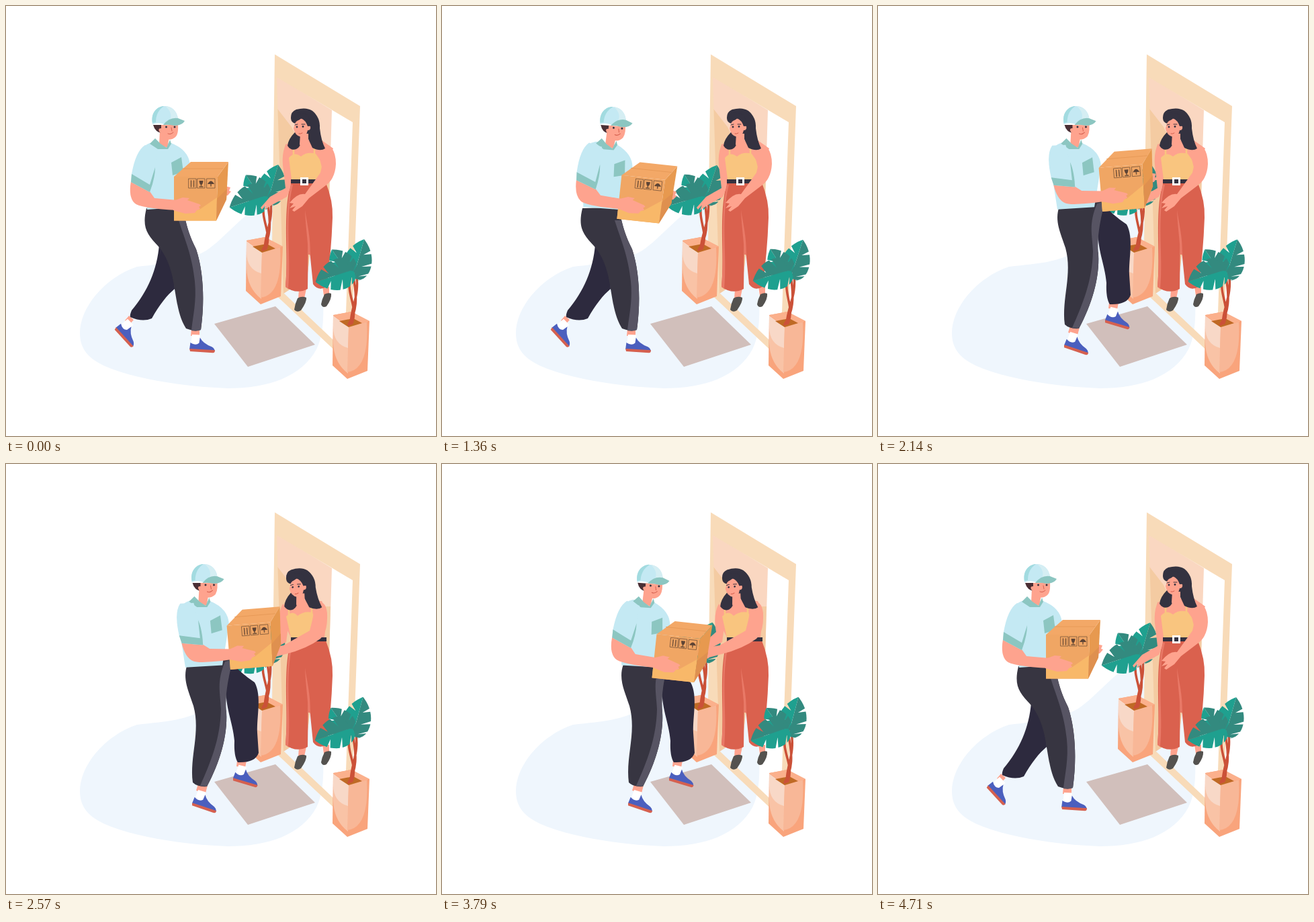
Recreate the animation shown at these times as an HTML page. Size 640 by 640 pixels, loop 4.78 s.

```html
<!DOCTYPE html>
<html lang="en">
<head>
<meta charset="utf-8">
<title>Parcel delivery</title>
<style>
html, body { margin: 0; width: 100%; height: 100%; overflow: hidden; background: #fff; }
svg { display: block; width: 100%; height: 100%; }
.skin { fill: #fea38e; }
.dark { fill: #343240; }
.near { fill: #373541; }
.far { fill: #2d2a3e; }
.stripe { fill: #575463; }
.cloth { fill: #c4e9f3; }
.teal { fill: #8cc6c1; }
.white { fill: #fff; }
.line { fill: none; stroke-linecap: round; stroke-linejoin: round; }
</style>
</head>
<body>
<svg viewBox="0 0 640 640">
<defs>
  <g id="shoe">
    <path class="white" d="M2,-9 3,-25H15L16,-10Z"/>
    <path fill="#4b5fbe" d="M0,-3 1,-13Q9,-8 14,-13L15,-21Q20,-12 33,-8 37,-6 38,-2Z"/>
    <path fill="#d5604f" d="M0,-4 38,-3Q38,1 35,1L1,0Z"/>
  </g>
  <g id="pot">
    <path fill="#f9a47c" d="M358,349 385,344 412,358 409,432 379,444 357,424Z"/>
    <path fill="#f9c3a6" d="M358,350 381,367 380,436Q359,420 358,390Z"/>
    <path fill="#f8d8c7" d="M358,350 381,367 380,398Q358,392 358,366Z"/>
    <path fill="#f8b797" d="M381,367 408,359Q412,430 379,434Z"/>
    <path fill="#fbb08c" d="M358,349 385,344 412,358 381,367Z"/>
    <path fill="#bf6a25" d="M367,358 388,354 401,361 381,367Z"/>
  </g>
  <g id="plant"></g>
</defs>

<path fill="#eff6fd" d="M110,487C110,450 145,405 195,388C235,383 265,383 298,364C325,346 350,312 385,292C430,290 460,365 472,428C473,460 473,490 462,511C440,552 390,569 330,569C260,566 190,555 145,535C120,523 110,508 110,487Z"/>
<path fill="#d1bfbb" d="M310,473 401,447 460,504 360,537Z"/>

<path fill="#fad7c1" d="M402,104 485,155 480,320 452,372 448,405 413,428 398,425Z"/>
<path fill="#f4cba2" d="M404,153 425,180 440,212H483L480,320 452,372 448,405 413,428 398,425Z"/>
<path fill="#f8dbb9" fill-rule="evenodd" d="M400,72 527,149 513,535 395,424ZM403,106 516,173 504,513 413,427Z"/>

<use href="#pot"/>
<use href="#plant" class="sway"/>

<g id="woman">
  <path class="skin" d="M436,421H447L444,435 435,436ZM471,418H481L481,430 473,431Z"/>
  <path fill="#54524f" d="M434,435Q440,431 447,434 448,440 439,453 433,457 429,452 430,443 434,435ZM474,429Q480,426 484,428 485,436 477,447 471,450 469,444 470,437 474,429Z"/>
  <path fill="#da614e" d="M424,263H476Q487,290 486,315 484,370 477,418 465,425 457,414L450,345 449,421Q432,430 416,418C421,370 411,310 424,263Z"/>
  <path fill="#e97967" d="M424,266C414,310 421,365 416,418L420,421C425,370 414,320 427,266ZM445,303C446,330 449,345 450,370L453,370C453,340 448,325 445,303Z"/>
  <g id="ready">
    <path class="skin" d="M416,206 436,200H470L487,212 467,258H424L412,228Z"/>
    <path class="skin" d="M417,205Q409,220 413,245L416,271 393,284 379,300 381,303 387,296 384,304 396,296 418,284Q425,270 424,258L423,218Z"/>
    <path fill="#f9c57f" d="M421,226Q429,216 439,224 448,216 461,220L471,234 466,258H425Z"/>
    <path class="line" stroke="#f9c57f" stroke-width="2.5" d="M428,222V208M459,222V208"/>
    <path class="dark" d="M424,258H467V264H424Z"/>
    <path class="white" d="M438,255H450V267H438Z"/>
    <path class="dark" d="M441,258H447V264H441Z"/>
    <path class="skin" d="M466,203Q491,204 491,235 490,257 476,267L451,286 441,298 429,306 426,304 431,298 422,301 428,294 422,293Q434,278 445,280L471,244 466,224Z"/>
  </g>
  <g id="reach">
    <path class="skin" d="M414,208 436,202 470,204 478,222 474,258H424L410,230Z"/>
    <path class="skin" d="M412,208Q403,225 408,250L384,271 361,279 359,289 371,290 389,280 417,265 422,228Z"/>
    <path fill="#f9c57f" d="M417,227Q426,217 434,226 444,218 456,221L464,238 466,258H424Z"/>
    <path class="line" stroke="#f9c57f" stroke-width="2.5" d="M421,224V212M455,222V208"/>
    <path class="dark" d="M424,258H477V264H424Z"/>
    <path class="skin" d="M461,205Q477,202 478,224 479,250 468,260 448,275 416,283L397,288 392,285 399,282 389,280 401,272 413,270 452,248 456,232Z"/>
  </g>
  <g id="face">
    <path class="dark" d="M424,166Q424,157 432,154 447,150 456,156 468,166 467,182 469,200 475,212 468,217 456,211L450,198 438,199Q440,209 432,213 424,216 419,208 420,198 430,188L431,175Q424,174 424,166Z"/>
    <path class="skin" d="M438,190H450V204L444,218 437,206ZM431,173Q440,164 448,170L449,178 453,179Q454,185 449,185 447,195 439,195 430,193 428,182Z"/>
    <path class="dark" d="M424,168Q434,174 439,167 446,170 449,179L455,178 449,162 430,157Z"/>
    <path class="line" stroke="#34323f" stroke-width="1" d="M430,177 434,176M440,176 445,176"/>
    <circle class="dark" cx="433" cy="180" r="1.4"/><circle class="dark" cx="442" cy="179.5" r="1.4"/>
    <path class="line" stroke="#d5604f" stroke-width="1" d="M436,190Q438,191 441,189"/>
  </g>
</g>

<g id="man">
  <g class="legs">
    <path class="skin" d="M183,461 190,467 184,474 177,468ZM276,480H288V491H275Z"/>
    <use href="#shoe" transform="translate(161 481) rotate(46)"/>
    <use href="#shoe" transform="translate(273 514) rotate(2)"/>
    <path class="far" d="M228,355C225,392 211,425 187,453Q184,460 185,463 203,471 217,465C228,445 240,430 251,421L250,380Z"/>
    <path class="near" d="M209,301C202,330 210,340 227,358C258,395 246,445 268,480Q280,485 290,482C296,440 294,395 283,362C273,342 270,330 267,318L262,300Z"/>
    <path class="stripe" d="M257,319C265,345 277,370 281,410C284,440 278,462 276,483Q284,485 290,482C296,440 294,395 283,362C273,342 270,330 267,319Z"/>
  </g>
  <g class="legs">
    <path class="skin" d="M245,451 257,456 251,465 241,460ZM279,478H293L291,490 279,489Z"/>
    <use href="#shoe" transform="translate(227 476) rotate(33)"/>
    <use href="#shoe" transform="translate(274 511) rotate(8)"/>
    <path class="far" d="M280,300C298,320 311,345 311,366C305,395 286,415 268,456Q256,459 245,453C247,435 260,420 260,365Z"/>
    <path class="near" d="M232,294C224,320 234,337 247,354C276,395 255,430 272,473Q279,484 294,481C302,450 305,410 304,380C302,340 300,318 292,292Z"/>
    <path class="stripe" d="M279,297C290,325 294,345 295,380C296,420 290,450 283,481L294,481C302,450 305,410 304,380C302,340 300,318 292,296Z"/>
  </g>
  <g class="legs">
    <path class="skin" d="M286,476 300,478 297,490 283,486ZM344,441H358L356,452 343,450Z"/>
    <use href="#shoe" transform="translate(276 508) rotate(17)"/>
    <use href="#shoe" transform="translate(337 471) rotate(15)"/>
    <path class="far" d="M332,292Q350,312 370,325C381,345 373,375 374,400L376,430Q371,445 345,444 339,435 340,412C338,385 325,360 328,330Z"/>
    <path class="near" d="M270,298C262,320 272,338 279,360C290,400 273,435 278,474Q285,481 299,480C318,445 330,405 328,370C325,345 332,312 338,290Z"/>
    <path class="stripe" d="M326,294C313,325 319,340 320,365C319,410 304,445 289,479L299,480C318,445 330,405 328,370C325,345 332,312 338,291Z"/>
  </g>
  <g id="body">
    <path class="cloth" d="M214,204Q203,208 200,218L203,262 210,303 265,299 274,238Q273,215 246,204Z"/>
    <path class="teal" d="M246,233 261,225 264,247 248,252Z"/>
    <g id="head">
      <path class="skin" d="M229,185 243,195 240,211 228,206Z"/>
      <path class="teal" d="M214,205 222,197 230,205 239,211 244,199 246,205 241,213 226,213Z"/>
      <path fill="#4a2f35" d="M219,177H236L232,189Q222,188 219,177Z"/>
      <path class="skin" d="M231,177H256Q257,192 251,196 243,202 236,195L229,188Q225,182 231,182Z"/>
      <path class="cloth" d="M218,176C215,158 226,149 236,149C249,149 255,159 256,168L238,177Q228,172 218,176Z"/>
      <path fill="#a2dbe0" d="M218,174C215,158 226,149 235,149Q223,157 223,173Z"/>
      <path fill="#d5eef3" d="M237,149C249,150 255,159 256,168L243,172Q250,160 237,149Z"/>
      <path class="teal" d="M234,177Q243,165 256,167L266,171Q262,178 250,178 242,176 234,177Z"/>
      <circle class="dark" cx="238.5" cy="180" r="1.5"/><circle class="dark" cx="251" cy="180" r="1.5"/>
      <path class="line" stroke="#d5604f" stroke-width="1" d="M241,190Q245,192 249,188M246,181 247,186"/>
    </g>
    <g class="hold">
      <path class="skin" d="M326,268 334,270 332,275 335,276 330,282 325,282Z"/>
      <path fill="#f0a664" d="M250,254H315L313,319.5H250Z"/>
      <path fill="#f8b869" d="M250,304 288,303 314,285 313,319.5H250Z"/>
      <path fill="#e7994f" d="M315,254 331,232 328,288 313,319.5Z"/>
      <path fill="#df904f" d="M314,287 329,272 328,288 313,319Z"/>
      <path fill="#f3a867" d="M250,254 275,232H331L315,254Z"/>
      <path class="line" stroke="#e79a58" d="M263,242H323"/>
      <g class="line" stroke="#7a563b" stroke-width=".8">
        <path d="M272,257H283V271H272ZM285,257H296V271H285ZM299,257H311V271H299Z"/>
        <path stroke-width="1.6" d="M275.5,269V260M279.5,269V260M290.5,264V268M288,269H293M305,263V268"/>
      </g>
      <path fill="#5e4435" d="M287.5,260H293.5Q293,266 290.5,266 288,266 287.5,260ZM300,265Q305,256 310,265Z"/>
    </g>
    <path id="arm" class="skin"/>
    <path class="skin hold" d="M249,290 263,285 273,286 270,289 288,295 290,297 287,299 289,302 284,304 281,308 267,309 249,304Z"/>
    <g id="sleeve">
      <path class="cloth" d="M207,207Q193,216 187,250L186,262 214,277 222,240 226,214Z"/>
      <path class="teal" d="M187,250 214,266 222,240Q222,256 214,277L186,262Z"/>
    </g>
  </g>
</g>

<use href="#pot" x="129" y="111"/>
<g transform="translate(128 111)"><use href="#plant" class="sway"/></g>
</svg>
<script>
const $ = id => document.getElementById(id);
const LOOP = 4780, CYCLE = 4640;

// One side of a leaf: a curved edge cut by notches towards the midrib.
function leafSide(len, wide, side, fill) {
  const edge = u => {
    const v = 1 - u, a = 3 * v * v * u, b = 3 * v * u * u;
    return [side * wide * (1.1 * a + 1.7 * b), 4 * v ** 3 + 14 * a - .55 * len * b - len * u ** 3];
  };
  const pts = [[0, 0]];
  for (let k = 0; k < 5; k++) {
    for (const f of [.14, .4, .65, .9]) pts.push(edge((k + f) / 5));
    const [x, y] = edge((k + 1) / 5);
    if (k < 4) pts.push([x * .35, y + 6]);
  }
  return `<path fill="${fill}" d="M${pts.join('L')}L0,${-len}Z"/>`;
}
const leaf = (x, y, turn, len, wide) =>
  `<g transform="translate(${x} ${y}) rotate(${turn})">` +
  leafSide(len, wide, -1, '#1fa08f') + leafSide(len, wide, 1, '#338a7f') + '</g>';

$('plant').innerHTML =
  '<path class="line" stroke="#cb5138" stroke-width="3.5" d="M382,363C393,345 396,325 388,288M387,361C396,335 380,325 383,290M385,362C386,335 399,320 393,284"/>' +
  leaf(390, 289, 16, 55, 20) + leaf(381, 286, -35, 42, 18) + leaf(384, 283, -108, 54, 22);

const legs = document.querySelectorAll('.legs');
const held = document.querySelectorAll('.hold');
const plants = document.querySelectorAll('.sway');
const move = (el, value) => el.setAttribute('transform', value);
const show = (el, on) => el.style.display = on ? '' : 'none';

function ease(t, from, to) {
  const k = Math.min(1, Math.max(0, (t - from) / (to - from)));
  return k * k * (3 - 2 * k);
}

// Upper arm swings about the shoulder, the forearm follows the parcel.
function armPath(swing, dx, dy) {
  const c = Math.cos(swing * Math.PI / 180), s = Math.sin(swing * Math.PI / 180);
  const at = (x, y) => [207 + (x - 207) * c - (y - 222) * s, 222 + (x - 207) * s + (y - 222) * c];
  return `M${at(186, 261)}Q${at(182, 284)} ${at(191, 293)} ${at(198, 301)} ${[255 + dx, 304 + dy]}` +
    `L${[255 + dx, 289 + dy]} ${at(221, 286)} ${at(214, 276)}Z`;
}

function draw(t) {
  const w = 2 * Math.PI * Math.min(1, Math.max(0, t - 70) / (CYCLE - 70));
  const lean = 4.5 * (1 - Math.cos(2 * w));
  const offer = ease(t, 800, 2000) - ease(t, 3200, 4100);
  const step = t < 1500 || t >= 4400 ? 0 : t < 2100 || t >= 3800 ? 1 : 2;
  const dx = 27 * offer, dy = -14 * offer, swing = -24 * offer;

  legs.forEach((g, i) => show(g, i === step));
  move($('body'), `translate(${step * 28.5} ${step === 1 ? -5 : 0}) rotate(${lean} 237 303)`);
  move($('head'), `rotate(${-lean / 2} 237 200)`);
  move($('sleeve'), `rotate(${swing} 207 222)`);
  $('arm').setAttribute('d', armPath(swing, dx, dy));
  held.forEach(g => move(g, `translate(${dx} ${dy}) rotate(${-5.5 * offer} 250 319)`));

  const reaching = t >= CYCLE / 2 && t < 4710;
  show($('reach'), reaching);
  show($('ready'), !reaching);
  move($('face'), reaching ? 'translate(-5 3) rotate(-3 440 205)' : '');

  const bend = 1.7 * (Math.sin(w) - .3 * Math.sin(2 * w));
  plants.forEach(g => move(g, `rotate(${bend} 384 362)`));
}

const start = performance.now();
function frame(now) {
  draw(Math.max(0, now - start) % LOOP);
  requestAnimationFrame(frame);
}
draw(0);
requestAnimationFrame(frame);
</script>
</body>
</html>
```
